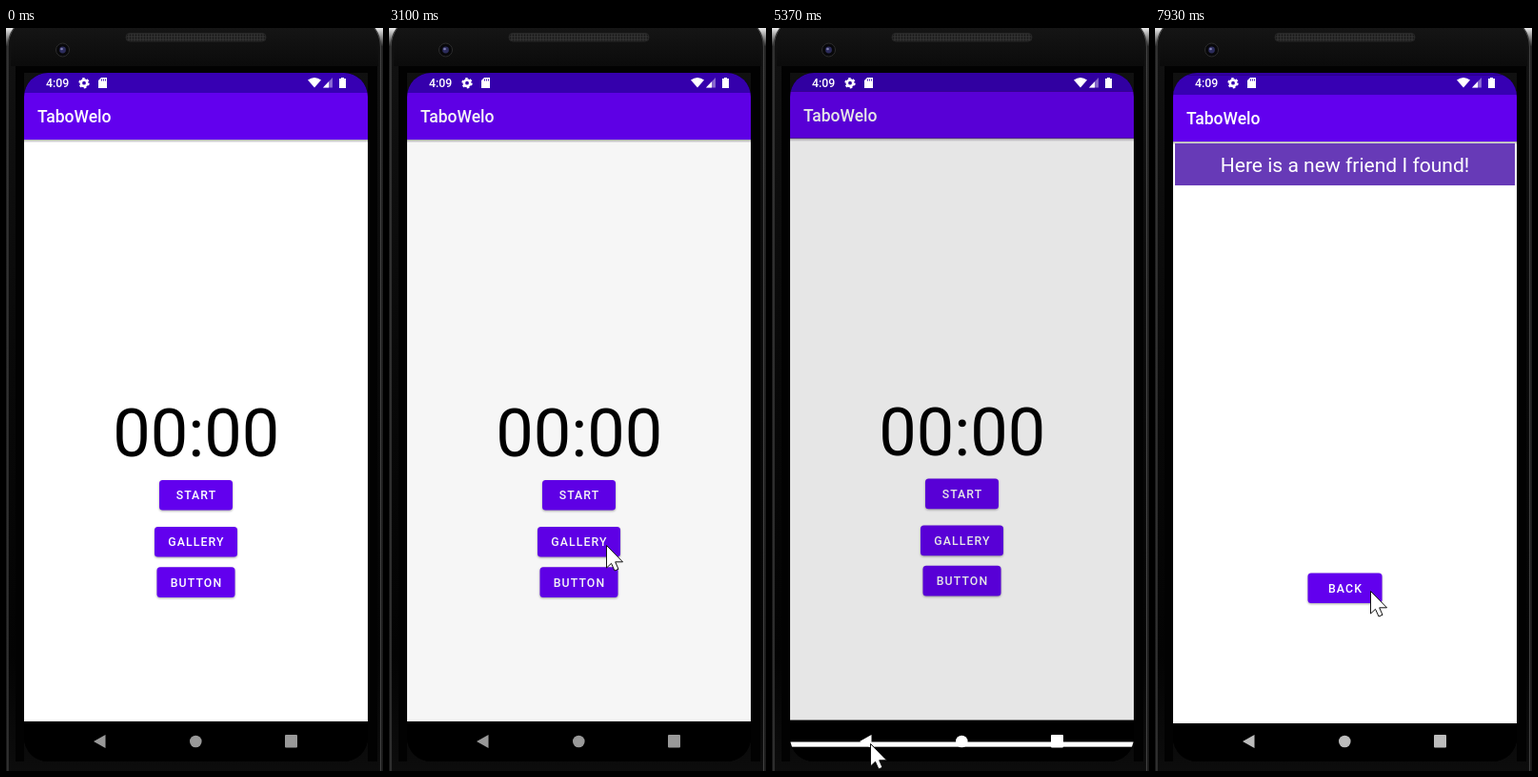
Animation, 396 px wide and 779 px high, one loop 8000 ms. Source, as an HTML page:

```html
<!DOCTYPE html>
<html lang="en">
<head>
<meta charset="utf-8">
<title>Timer app demo</title>
<style>
  html, body { margin: 0; width: 100%; height: 100%; overflow: hidden; background: #000; }
  svg { display: block; }
  text { font-family: Roboto, sans-serif; fill: #fff; }
  .mid { text-anchor: middle; }
  .label { font-size: 12.3px; font-weight: 500; letter-spacing: 1.1px; }
  .button { filter: drop-shadow(0 1.5px 1px rgba(0, 0, 0, .35)); }
</style>
</head>
<body>
<svg width="396" height="779" viewBox="0 0 396 779">
  <defs>
    <linearGradient id="outside" x2="0" y2="1">
      <stop stop-color="#eee"/><stop offset=".025" stop-color="#222"/><stop offset="1" stop-color="#1a1a1a"/>
    </linearGradient>
    <linearGradient id="body" x2="0" y2="1">
      <stop stop-color="#121212"/><stop offset=".45" stop-color="#080808"/>
      <stop offset=".8" stop-color="#030303"/><stop offset="1" stop-color="#101010"/>
    </linearGradient>
    <linearGradient id="forehead" x2="0" y2="1">
      <stop stop-color="#151515"/><stop offset="1" stop-color="#0b0b0b"/>
    </linearGradient>
    <linearGradient id="shade" x2="0" y2="1">
      <stop stop-color="#000" stop-opacity=".32"/><stop offset="1" stop-color="#000" stop-opacity="0"/>
    </linearGradient>
    <linearGradient id="wall" x2="1" y2=".6">
      <stop stop-color="#aaa5a2"/><stop offset="1" stop-color="#c3bbb6"/>
    </linearGradient>
    <linearGradient id="fur" x2="0" y2="1">
      <stop stop-color="#70747c"/><stop offset="1" stop-color="#3f4148"/>
    </linearGradient>
    <radialGradient id="face" cy=".35">
      <stop stop-color="#8a8d94"/><stop offset="1" stop-color="#62666e"/>
    </radialGradient>
    <pattern id="mesh" width="3" height="3" patternUnits="userSpaceOnUse">
      <rect width="3" height="3" fill="#303030"/><circle cx="1.5" cy="1.5" r=".9" fill="#151515"/>
    </pattern>
    <pattern id="weave" width="5" height="4" patternUnits="userSpaceOnUse">
      <rect width="5" height="4" fill="#a49b96"/><path d="M0 1h3" stroke="#b8afaa"/>
    </pattern>
    <filter id="soft"><feGaussianBlur stdDeviation="1.2"/></filter>
    <clipPath id="screen"><rect x="19" y="47" width="361" height="722" rx="25"/></clipPath>
    <clipPath id="reveal"><rect id="revealBox" x="19" y="47" width="361" height="722"/></clipPath>
    <g id="frame">
      <rect x="19" y="47" width="361" height="722"/>
      <rect x="19" y="117" width="361" height="610" fill="#fff"/>
      <rect x="19" y="47" width="361" height="21" fill="#3700b3"/>
      <rect x="19" y="68" width="361" height="49" fill="#6200ee"/>
      <rect x="19" y="117" width="361" height="3.5" fill="url(#shade)"/>
      <text x="33" y="99" font-size="17.5" font-weight="500">TaboWelo</text>
    </g>
  </defs>

  <!-- phone -->
  <rect width="396" height="779" fill="url(#outside)"/>
  <rect x="2" y="-14" width="391.5" height="840" rx="34" fill="url(#body)" stroke="#404040" stroke-width="1.2"/>
  <path d="M10 0H386Q391 10 391 40H5Q5 10 10 0Z" fill="url(#forehead)"/>
  <path d="M10 40H390V769H380V47H19V769H10Z" fill="#020202"/>
  <rect x="126" y="5.5" width="147" height="8.5" rx="4" fill="url(#mesh)" stroke="#262626"/>
  <circle cx="59.5" cy="23" r="7" fill="#08080a" stroke="#2c2c2c"/>
  <circle cx="59.5" cy="23" r="3.4" fill="#2c2c5c"/>
  <circle cx="58.5" cy="22" r="1.3" fill="#8080b0"/>

  <g clip-path="url(#screen)">
    <rect x="19" y="47" width="361" height="722"/>
    <g id="home">
      <use href="#frame"/>
      <text class="mid" x="199.7" y="449.3" font-size="70.3" style="fill:#000">00:00</text>
      <g id="homeButtons"></g>
    </g>
    <g clip-path="url(#reveal)">
      <g id="page">
        <use href="#frame"/>
        <g id="gallery">
          <svg x="21" y="119" width="177" height="175">
            <rect width="177" height="175" fill="#c6b8a5"/>
            <g filter="url(#soft)">
              <path d="M0 0H48L34 60L20 100H0Z" fill="#cfc4b4"/>
              <path d="M128 0H177V42L140 40Z" fill="#d5c8b5"/>
              <path d="M140 38L177 46V125H145Z" fill="#72594a"/>
              <path d="M0 132H177V175H0Z" fill="#d0bd9c"/>
              <path d="M100 170L145 152L177 148V175H90Z" fill="#75593f"/>
              <path d="M0 108Q18 102 38 114V131H0Z" fill="#505158"/>
              <path d="M44 75Q24 115 32 152Q50 170 90 168Q150 170 154 148Q154 112 134 75Z" fill="url(#fur)"/>
              <path d="M38 40Q34 18 62 21Q88 8 114 23Q140 20 141 42L139 70Q126 97 96 101Q56 98 42 70Z" fill="url(#face)"/>
              <path d="M37 42Q38 22 66 19L58 38ZM141 44Q142 24 110 23L126 38Z" fill="#5a5d66"/>
              <path d="M63 104Q90 94 122 103Q120 122 98 140Q76 134 63 104Z" fill="#e2ddda"/>
              <path d="M89 126Q100 112 121 110Q112 122 90 126Z" fill="#74492c"/>
              <ellipse cx="114" cy="157" rx="16" ry="9" fill="#bdbab9"/>
              <circle cx="75" cy="66" r="8.5" fill="#8f6f3c"/><circle cx="116" cy="61" r="8.5" fill="#8f6f3c"/>
              <circle cx="75" cy="66" r="5" fill="#191716"/><circle cx="116" cy="61" r="5" fill="#191716"/>
              <path d="M90 83L106 82L98 95Z" fill="#222226"/>
            </g>
            <path d="M108 89Q138 86 172 108M108 92Q135 95 160 118M90 92Q60 92 32 108" fill="none" stroke="#ccc" stroke-width=".6"/>
          </svg>
          <svg x="201" y="119" width="177" height="175">
            <rect width="177" height="175" fill="url(#wall)"/>
            <path d="M0 117Q90 108 177 108V175H0Z" fill="url(#weave)"/>
            <g filter="url(#soft)">
              <path d="M0 76Q25 60 60 56L90 62L110 110L60 114Q30 122 4 114Z" fill="#cfcac8"/>
              <path d="M84 74Q94 46 124 44Q148 54 177 74V112H140Q110 106 84 74Z" fill="#d6d1cf"/>
              <path d="M0 80Q18 64 26 84Q36 106 18 117Q0 114 0 80Z" fill="#77747a"/>
              <path d="M34 90Q58 74 82 88Q80 106 54 108Q36 104 34 90Z" fill="#67656b"/>
              <path d="M46 60Q74 48 90 62Q86 74 74 70Z" fill="#625f65"/>
              <path d="M155 62Q170 54 177 66V78Z" fill="#8d888a"/>
              <path d="M56 111L104 86Q122 88 116 102L72 121Q56 122 56 111Z" fill="#d9d1cb"/>
              <path d="M116 106Q126 94 142 112Q138 120 118 115Z" fill="#5f534c"/>
              <circle cx="134" cy="112" r="8" fill="#b0a091"/>
            </g>
          </svg>
        </g>
        <g id="friend">
          <rect x="21" y="119" width="357" height="44" fill="#673ab7"/>
          <text class="mid" x="199.5" y="149" font-size="21.07">Here is a new friend I found!</text>
          <g id="friendButtons"></g>
        </g>
      </g>
    </g>

    <!-- status bar -->
    <g fill="#fff">
      <text x="42" y="62" font-size="12.3" font-weight="500">4:09</text>
      <circle cx="82" cy="57.7" r="3.2" fill="none" stroke="#fff" stroke-width="2.6"/>
      <circle cx="82" cy="57.7" r="4.8" fill="none" stroke="#fff" stroke-width="1.8" stroke-dasharray="2.5 2.53"/>
      <path d="M100 52H106V63H97V55Z"/>
      <path d="M100.5 53.5v2M102.5 53.5v2M104.5 53.5v2" stroke="#3700b3" stroke-width=".9"/>
      <path d="M317 54.5Q324 49.5 331 54.5L324 62.5Z"/>
      <path d="M343 52V62.5H333Z" opacity=".4"/><path d="M339 56.2V62.5H333Z"/>
      <path d="M350 53H352V52H355V53H357V63H350Z"/>
    </g>

    <!-- navigation bar -->
    <rect id="navRipple" x="66" y="728" width="66" height="40" rx="20" fill="#fff"/>
    <g id="nav">
      <path d="M92 748L104.5 741V755Z"/><circle cx="199.3" cy="748" r="6.3"/>
      <rect x="293" y="741" width="13" height="13.5" rx="1"/>
    </g>
  </g>

  <g id="pointer">
    <circle id="halo" r="18" fill="rgb(255,248,20)" opacity=".56"/>
    <path d="M.5 .5V24L5.5 19.3L9 27L13 25.3L9.7 17.8H17.5Z" fill="#fff" stroke="#111"/>
  </g>
</svg>

<script>
const $ = id => document.getElementById(id);
const LOOP = 8000, SLIDE = 550;
const galleryOpen = 3120, galleryClose = 5163, friendOpen = 7687;
const clicks = [2300, 4730, 6580];

const pointerKeys = [[440, 397, 700], [1220, 228, 542], [3840, 228, 542], [4530, 103, 750],
                     [5370, 103, 750], [6050, 226, 590], [LOOP, 226, 590]];
const navKeys = [[0, 153], [4950, 153], [5200, 255], [6580, 255], [7180, 224], [7660, 217], [7930, 188], [LOOP, 188]];

const button = (label, width, y) => `<g class="button">
  <rect x="${199.5 - width / 2}" y="${y}" width="${width}" height="31.6" rx="3.5" fill="#6200ee"/>
  <text class="mid label" x="200" y="${y + 20.3}">${label}</text>
  <rect id="ripple${label}" x="${199.5 - width / 2}" y="${y}" width="${width}" height="31.6" rx="3.5" fill="#fff" opacity="0"/></g>`;
$('homeButtons').innerHTML = button('START', 77, 474) + button('GALLERY', 87, 523) + button('BUTTON', 82, 565.3);
$('friendButtons').innerHTML = button('BACK', 78, 569.5);

const clamp = v => Math.max(0, Math.min(1, v));
const ramp = (t, from, to) => clamp((t - from) / (to - from));
const smooth = v => (1 - Math.cos(Math.PI * v)) / 2;
const show = (id, on) => $(id).setAttribute('display', on ? 'inline' : 'none');
const fade = (id, v) => $(id).setAttribute('opacity', v);
const move = (id, x, y) => $(id).setAttribute('transform', `translate(${x} ${y})`);

function track(t, keys, ease = v => v) {
  let i = 0;
  while (i < keys.length - 2 && t >= keys[i + 1][0]) i++;
  const [a, b] = [keys[i], keys[i + 1]];
  const k = ease(ramp(t, a[0], b[0]));
  return a.slice(1).map((v, n) => v + (b[n + 1] - v) * k);
}

// Two joined Bezier curves: quick start, very slow finish
function slideEase(x) {
  const [xs, ys] = x < 1 / 6 ? [[0, .05, .1333, 1 / 6], [0, 0, .06, .4]]
                             : [[1 / 6, .2083, .25, 1], [.4, .82, 1, 1]];
  const cubic = (p, s) => p[0] * (1 - s) ** 3 + 3 * p[1] * (1 - s) ** 2 * s + 3 * p[2] * (1 - s) * s * s + p[3] * s ** 3;
  let low = 0, high = 1;
  for (let i = 0; i < 20; i++) {
    const s = (low + high) / 2;
    if (cubic(xs, s) < x) low = s; else high = s;
  }
  return cubic(ys, low);
}

function drawWindows(t) {
  const closing = t >= galleryClose && t < friendOpen - 60;
  const start = closing ? galleryClose : t < galleryClose ? galleryOpen : friendOpen;
  const p = slideEase(ramp(t, start, start + SLIDE));
  const away = closing ? p : 1 - p;
  const cut = closing ? 1 - (1 - away) ** 1.6 : away ** 3;
  const top = 47 + 29.6 * away + 692 * cut;
  const dim = closing ? 1 - ramp(t, start + 250, start + SLIDE) : ramp(t, start - 60, start + 60);

  show('gallery', start !== friendOpen);
  show('friend', start === friendOpen);
  show('page', away < 1);
  move('page', 0, 29.6 * away);
  $('revealBox').setAttribute('y', top);
  move('home', 0, -14.4 * (1 - away));
  fade('home', 1 - .1 * dim);
}

const ripple = (t, start, end) => .2 * ramp(t, start + 60, start + 180) * (1 - ramp(t, start + 220, end));

function draw(now) {
  const t = now % LOOP;
  drawWindows(t);
  fade('rippleGALLERY', ripple(t, 2300, 2770));
  fade('rippleBUTTON', ripple(t, 6580, 7100));
  fade('navRipple', .16 * ramp(t, 4730, 4790) * (1 - ramp(t, 4880, 5130)));
  const [gray] = track(t, navKeys);
  $('nav').setAttribute('fill', `rgb(${gray},${gray},${gray})`);
  show('pointer', t >= 460);
  show('halo', clicks.some(c => t >= c && t < c + 200));
  move('pointer', ...track(t, pointerKeys, smooth));
  requestAnimationFrame(draw);
}
requestAnimationFrame(draw);
</script>
</body>
</html>
```
